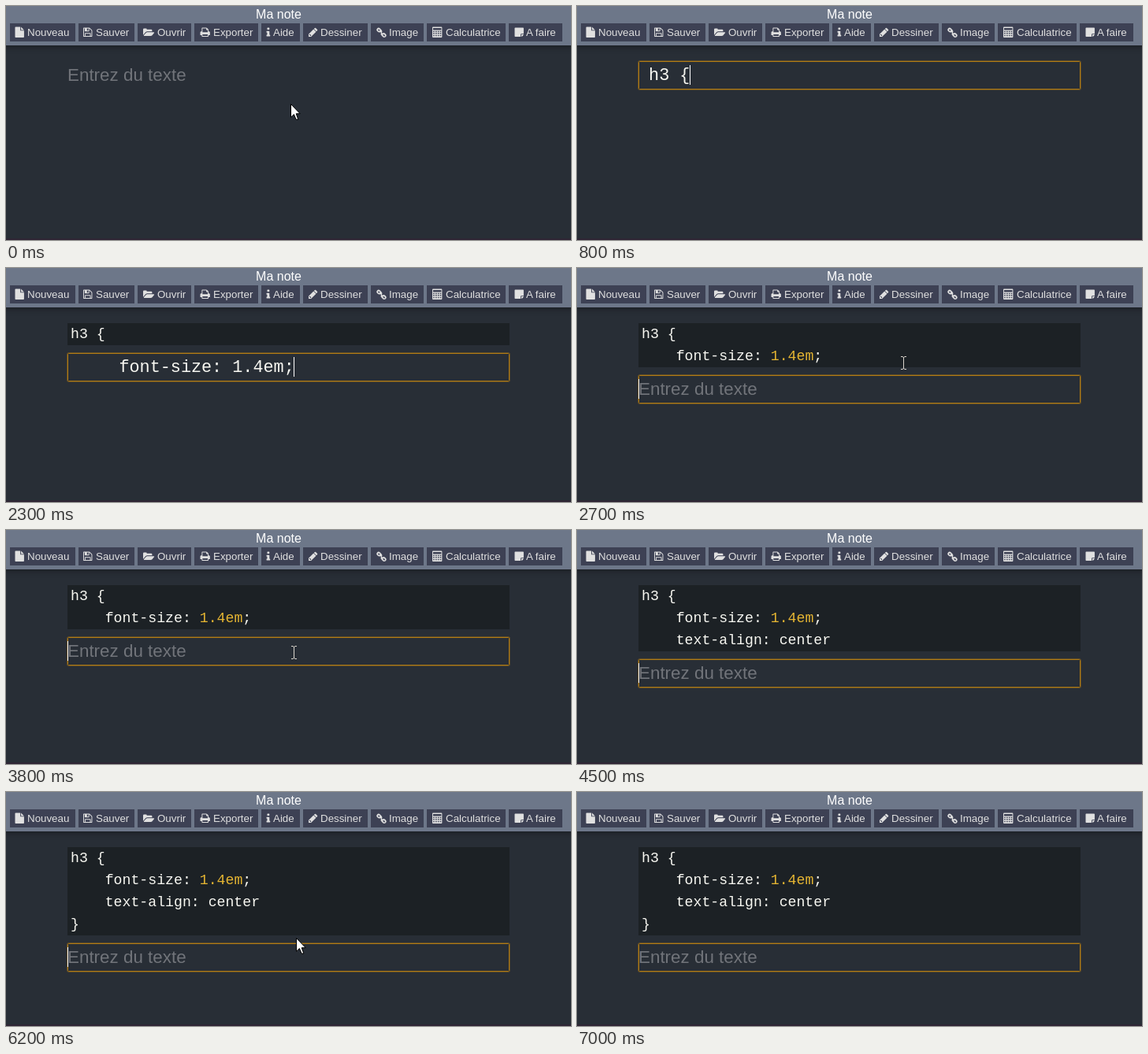
Animation of 717x297 px, one loop 7200 ms. Source, as an HTML page:

```html
<!DOCTYPE html>
<html lang="fr">
<head>
<meta charset="utf-8">
<title>Ma note</title>
<style>
  html, body { margin: 0; width: 100%; height: 100%; overflow: hidden; background: #282e36; }
  svg { display: block; width: 717px; height: 297px; }
  text { font-family: "Liberation Sans", Arial, sans-serif; white-space: pre; }
  .bar { fill: #6d7789; filter: drop-shadow(0 0 5px rgba(0, 0, 0, .55)); }
  .title { font-size: 16px; fill: #fff; text-anchor: middle; }
  .button rect { fill: #3d4154; }
  .button text { font-size: 13.33px; fill: #e0e0e0; }
  .icon { fill: #e0e0e0; fill-rule: evenodd; }
  .hint { font-size: 22.4px; fill: #71747a; }
  .mono { font-family: "Liberation Mono", "Courier New", monospace; fill: #f8f8f2; }
  #code text { font-size: 18.2px; }
  #typed { font-size: 21.8px; }
  .num { fill: #e5b532; }
  #ring rect { fill: none; stroke: #b27c14; }
</style>
</head>
<body>
<svg viewBox="0 0 717 297">
  <rect width="717" height="297" fill="#282e36"/>
  <rect y="295" width="717" height="2" fill="#2e2534"/>
  <rect class="bar" x="-20" y="-20" width="757" height="70"/>
  <text class="title" x="346" y="16">Ma note</text>
  <g id="buttons"></g>

  <rect id="block" x="78" y="70" width="561" fill="#1c2125"/>
  <g id="code">
    <text class="mono" x="82" y="89">h3 {</text>
    <text class="mono" x="82" y="117">    font-size: <tspan class="num">1.4em</tspan>;</text>
    <text class="mono" x="82" y="145">    text-align: center</text>
    <text class="mono" x="82" y="173">}</text>
  </g>

  <g id="field">
    <text id="hint" class="hint" x="78" y="26">Entrez du texte</text>
    <text id="typed" class="mono" x="78" y="25"></text>
    <g id="ring">
      <rect x="77.5" y=".5" width="562" height="37" rx="2" opacity=".4"/>
      <rect x="78.5" y="1.5" width="560" height="35" rx="1"/>
    </g>
    <rect id="caret" y="6" width="1" height="25" fill="#fff"/>
  </g>

  <g id="arrow" fill="#fff" stroke="#000" stroke-linejoin="round">
    <path d="M.5.5V17.2L4.4 13.5 7.1 20h2.7L7.2 12.7h5z"/>
  </g>
  <g id="hand" fill="#fff" stroke="#000" stroke-linejoin="round">
    <path d="M5.5 13V2Q5.5.5 7 .5T8.5 2v5.5q3-1 3 1 3-.8 3 1.2 2-.6 2 1.3v4q0 2-1.5 4v3.5H7V20L1.2 13.2Q0 11.4 1.6 10.6T4 11.4z"/>
    <path d="M8.5 7.5V11M11.5 8.5V11M14.5 9.7V12" fill="none"/>
  </g>
  <g id="beam" fill="none" stroke="#d9d4cc">
    <path d="M-3 .5H-1L.5 1.5 2 .5H4M.5 1V16M-3 16.5H-1L.5 15.5 2 16.5H4"/>
  </g>
</svg>
<script>
  const $ = id => document.getElementById(id);

  // Icon outlines on a 14-unit grid
  const key = (x, y) => `M${x} ${y}h1.7v1.5h-1.7z`;
  const keys = [5.4, 8, 10.8].flatMap(y => [1.2, 4.2, 7.2, 10.1].map(x => key(x, y))).join("");
  const icons = {
    file: "M0 .8Q0 0 .8 0H7v4.3q0 .7.7.7H12v8.2q0 .8-.8.8H.8Q0 14 0 13.2zM8 0l4 4H8z",
    disk: "M3 12h6V9H3zM10 12h1V5L8 2v3.2q0 .8-.8.8H2.8Q2 6 2 5.2V2H1v10h1V8.8Q2 8 2.8 8h6.4q.8 0 .8.8z" +
      "M5 2v3h2V2zM12 5v7.2q0 .8-.8.8H.8Q0 13 0 12.2V1.8Q0 1 .8 1H8q.6 0 1 .4L11.6 4q.4.4.4 1z",
    folder: "M14.9 7.5q0 .25-.25.55l-2.6 3.1Q11.4 12 10 12H1.5q-1.1 0-.4-.95l2.6-3.1Q4.4 7 5.75 7h8.5q.65 0 .65.5z" +
      "M12 4.5V6H5.75Q4.2 6 3 7.25L.1 10.7 0 10.2V3.25Q0 2 1.25 2h2.5Q5 2 5 3.3h5.75Q12 3.3 12 4.5z",
    print: "M13 7.5V11h-2v1.2q0 .8-.8.8H2.8Q2 13 2 12.2V11H0V7.5Q0 6 1.5 6H2V1.8Q2 1 2.8 1H8q.6 0 1.1.5l1.4 1.4q.5.5.5 1.1v2h.5Q13 6 13 7.5z" +
      "M3 12h7v-2H3zM3 7h7V4H8V2H3z",
    info: "M5 11v1q0 .5-.5.5h-4Q0 12.5 0 12v-1q0-.5.5-.5H1v-3H.5Q0 7.5 0 7V6q0-.5.5-.5h3Q4 5.5 4 6v4.5h.5q.5 0 .5.5z" +
      "M4 1.5V3q0 .5-.5.5h-2Q1 3.5 1 3V1.5Q1 1 1.5 1h2q.5 0 .5.5z",
    pencil: "M0 9.7l6.6-6.6 3.3 3.3L3.3 13H0zM1 10.2v.8h1v1h.8l.7-.7-1.8-1.8zM11.6 4.7l-1.2 1.2L7.1 2.6l1.2-1.2q.6-.6 1.2 0l2.1 2.1q.6.6 0 1.2z",
    link: "M1 2Q3-.1 5 2l2 2q1.7 1.8.2 3.6l.9.8Q10 7 11.8 8.8l.6.6q2 2 0 3.8-2 1.6-3.8 0l-2-2Q5 9.500 6.300 7.700L5.400 6.900Q3.500 8 1.700 6.300L1 5.700Q-.8 4 1 2z" +
      "M2.500 3.200Q1.900 3.900 2.500 4.500L3.300 5.300 4.200 5.400 4 4.300 5 4 5.600 5 5.800 4.900 3.700 3.200Q3.100 2.700 2.500 3.200z" +
      "M7.800 9.300Q7.600 9.900 8 10.200l2 2q.6.500 1.200 0t0-1.300L9.800 9.600 9.300 9.500 9.400 10.500 8.500 10.600z",
    calc: "M1 0h11q1 0 1 1v12q0 1-1 1H1q-1 0-1-1V1Q0 0 1 0zM1 1.500v2.500h11V1.500z" + keys,
    note: "M8 9.8V13H.8Q0 13 0 12.200V1.800Q0 1 .8 1h10.400q.8 0 .8.8V9H8.800Q8 9 8 9.800zM9 10h3q0 .5-.5 1L10 12.500q-.5.500-1 .500z"
  };

  // left edge, width, icon x, label x
  const buttons = [
    ["file", "Nouveau", 5, 83, 11.5, 27],
    ["disk", "Sauver", 92, 71, 98, 114],
    ["folder", "Ouvrir", 167, 68, 174, 192],
    ["print", "Exporter", 239, 81, 246.5, 263],
    ["info", "Aide", 324, 49, 330.5, 339],
    ["pencil", "Dessiner", 377, 82, 384, 399],
    ["link", "Image", 463, 67, 470, 486],
    ["calc", "Calculatrice", 534, 100, 541, 558],
    ["note", "A faire", 638, 68, 645.5, 660]
  ];
  $("buttons").innerHTML = buttons.map(([icon, label, x, w, ix, tx]) =>
    `<g class="button"><rect x="${x}" y="22" width="${w}" height="23"/>
     <path class="icon" transform="translate(${ix} 26.6) scale(.952)" d="${icons[icon]}"/>
     <text x="${tx}" y="38">${label}</text></g>`).join("");

  const at = (kind, x, y) => ({ pointer: [kind, x, y] });
  const gone = { pointer: null };
  const on = { caret: true }, off = { caret: false };
  const focus = { focus: true, caret: true }, blur = { focus: false, caret: false };
  const type = typed => ({ typed, caret: true, pointer: null });
  const enter = lines => ({ lines, typed: "", focus: true, caret: true });

  // Each step changes part of the state
  const steps = [
    [0, { lines: 0, typed: "", ...blur, ...at("arrow", 361, 124) }],
    [100, { ...focus, ...at("beam", 366, 84) }],
    [200, gone],
    [400, type(" ")],
    [500, type(" h")],
    [600, type(" h3")],
    [700, type(" h3 ")],
    [800, type(" h3 {")],
    [900, enter(1)],
    [1200, off],
    [1300, blur],
    [1700, at("hand", 642, 39)],
    [1800, at("hand", 520, 22)],
    [1900, { ...focus, ...at("beam", 362, 118) }],
    [2100, type(" ")],
    [2300, type("     font-size: 1.4em;")],
    [2700, { ...enter(2), ...at("beam", 414, 112) }],
    [2800, at("beam", 424, 98)],
    [2900, gone],
    [3200, blur],
    [3600, { ...focus, ...at("beam", 372, 151) }],
    [3700, at("beam", 367, 149)],
    [3800, at("beam", 365, 147)],
    [3900, type(" ")],
    [4100, type("     text-align: center")],
    [4400, enter(3)],
    [4700, off],
    [4900, on],
    [5100, at("beam", 392, 166)],
    [5200, gone],
    [5400, type(" ")],
    [5600, off],
    [5800, on],
    [6000, { ...type(" }"), ...off }],
    [6200, { ...enter(4), ...at("arrow", 368, 185) }],
    [6400, at("arrow", 384, 190)],
    [6500, { ...off, ...at("arrow", 436, 206) }],
    [6600, at("arrow", 512, 230)],
    [6700, at("arrow", 588, 254)],
    [6800, at("arrow", 644, 272)],
    [6900, at("arrow", 673, 286)],
    [7000, gone]
  ];

  const show = (el, visible) => el.setAttribute("display", visible ? "inline" : "none");

  function draw(time) {
    const s = {};
    for (const [start, change] of steps) if (start <= time) Object.assign(s, change);

    $("block").setAttribute("height", s.lines * 28);
    [...$("code").children].forEach((line, i) => show(line, i < s.lines));
    $("field").setAttribute("transform", `translate(0 ${s.lines ? 79 + 28 * s.lines : 69})`);
    show($("hint"), !s.typed);
    $("typed").textContent = s.typed;
    show($("ring"), s.focus);
    show($("caret"), s.caret);
    $("caret").setAttribute("x", Math.floor(78 + 13.08 * s.typed.length));

    for (const kind of ["arrow", "hand", "beam"]) {
      const active = s.pointer && s.pointer[0] === kind;
      show($(kind), active);
      if (active) $(kind).setAttribute("transform", `translate(${s.pointer[1]} ${s.pointer[2]})`);
    }
  }

  function tick() {
    draw(performance.now() % 7200);
    requestAnimationFrame(tick);
  }
  tick();
</script>
</body>
</html>
```
